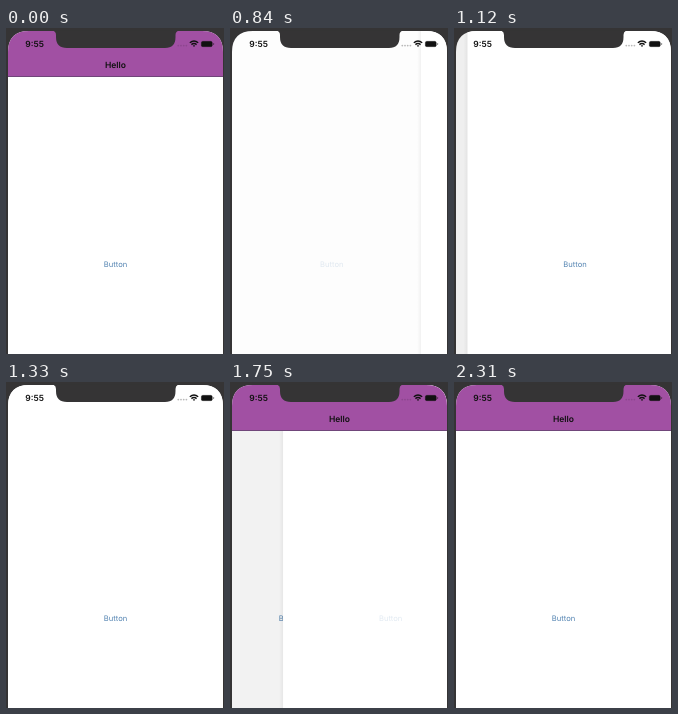
Recreate the animation shown at these times as an HTML page. Size 218 px wide and 326 px high, loop 3.08 s.

```html
<!DOCTYPE html>
<html lang="en">
<head>
<meta charset="utf-8">
<title>Navigation push and pop</title>
<style>
  html, body { margin: 0; width: 100%; height: 100%; overflow: hidden; background: #353435; }
  svg { display: block; width: 218px; height: 326px; }
  text { font-family: Inter, "Liberation Sans", sans-serif; text-rendering: geometricPrecision; }
  .button { font-size: 7.6px; fill: #5484b2; text-anchor: middle; }
  .bold { font-size: 8.5px; font-weight: 600; fill: #111; }
</style>
</head>
<body>
<svg viewBox="0 0 218 326">
  <defs>
    <clipPath id="screen"><path d="M2 330V24Q2 3 23 3H196Q217 3 217 24V330Z"/></clipPath>
    <linearGradient id="shade">
      <stop offset="0" stop-opacity="0"/>
      <stop offset="1" stop-opacity=".05"/>
    </linearGradient>
  </defs>
  <rect width="218" height="326" fill="#353435"/>
  <g clip-path="url(#screen)">
    <g id="first">
      <rect x="2" width="280" height="326" fill="#fff"/>
      <text id="firstButton" class="button" x="109.5" y="238.6">Button</text>
    </g>
    <rect id="dim" width="218" height="326"/>
    <g id="second">
      <rect x="-2" width="4" height="326" fill="url(#shade)"/>
      <rect x="2" width="216" height="326" fill="#fff"/>
      <text id="secondButton" class="button" x="109.5" y="238.6">Button</text>
    </g>
    <g id="bar">
      <rect width="218" height="48" fill="#a150a3"/>
      <rect y="48" width="218" height="1" fill="#70467a"/>
      <text class="bold" x="109.5" y="40.2" text-anchor="middle">Hello</text>
    </g>
    <text class="bold" x="19.3" y="19">9:55</text>
    <g id="dots">
      <circle cx="172.3" cy="17.6" r=".9"/><circle cx="175" cy="17.6" r=".9"/>
      <circle cx="177.7" cy="17.6" r=".9"/><circle cx="180.4" cy="17.6" r=".9"/>
    </g>
    <g fill="none" stroke="#111" stroke-width="1.4">
      <path d="M183.8 14.8Q188 11.2 192.2 14.8M185.4 16.6Q188 14.4 190.6 16.6"/>
      <path d="M188 19L186.7 17.6Q188 16.7 189.3 17.6Z" fill="#111" stroke="none"/>
    </g>
    <rect x="195.3" y="13.3" width="11" height="5.4" rx="1.5" fill="#111" stroke="#111" stroke-opacity=".4" stroke-width=".7"/>
    <rect x="207.1" y="15" width="1" height="2" rx=".5" fill="#111" opacity=".5"/>
  </g>
  <path d="M46 2.5Q50 3 50 7V9Q50 20 61 20H159Q169.500 20 169.500 9V7Q169.500 3 173.500 2.500Z" fill="#353435"/>
</svg>
<script>
const LOOP = 3080, STEP = 70, WIDTH = 215, PARALLAX = 0.3;
const PUSH = { press: 700, start: 799, end: 1260 };
const POP = { press: 1610, start: 1686, end: 2100 };
const el = id => document.getElementById(id);

// Critically damped slide that settles at the end of the transition.
function slide(t, { start, end }) {
  if (t <= start) return 0;
  if (t >= end) return 1;
  const w = (t - start) * 0.0145;
  return 1 - (1 + w) * Math.exp(-w);
}

const shift = (id, x) => el(id).setAttribute('transform', `translate(${x} 0)`);
const fade = (id, opacity) => el(id).setAttribute('opacity', opacity);
const pressed = (t, move) => t >= move.press && t < move.end ? 0.17 : 1;

function draw(t) {
  const cover = slide(t, PUSH) - slide(t, POP);
  const barHidden = t >= PUSH.start && t < POP.start;
  shift('first', -WIDTH * PARALLAX * cover);
  shift('second', WIDTH * (1 - cover));
  fade('second', cover > 0 ? 1 : 0);
  fade('dim', 0.068 * cover);
  fade('bar', barHidden ? 0 : 1);
  fade('dots', barHidden ? 0.27 : 0.12);
  fade('firstButton', pressed(t, PUSH));
  fade('secondButton', pressed(t, POP));
}

const origin = performance.now();
function tick() {
  const t = (performance.now() - origin) % LOOP;
  draw(Math.floor(t / STEP) * STEP);
  requestAnimationFrame(tick);
}
tick();
</script>
</body>
</html>
```
